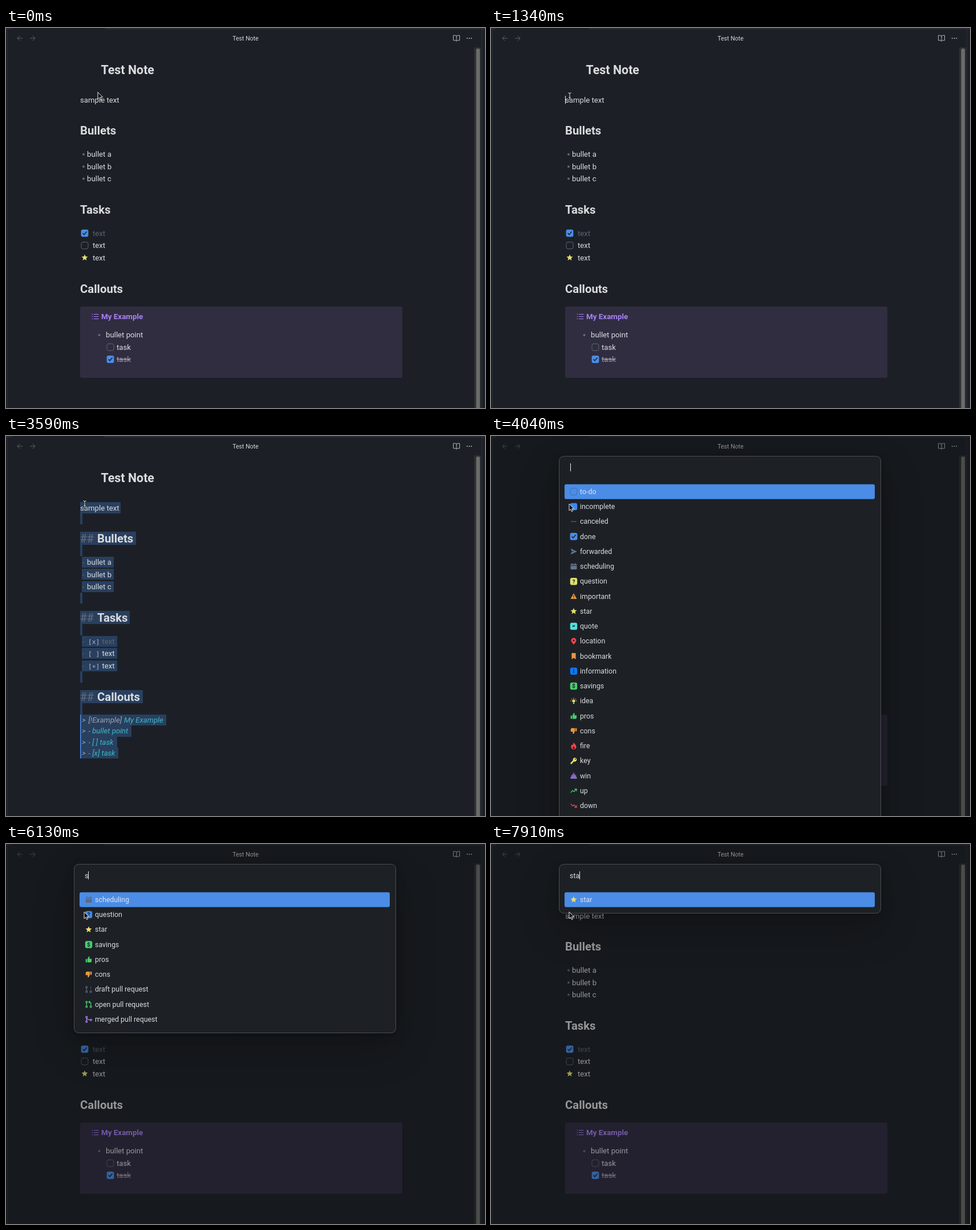
Write an HTML page with a canvas that moves like this. It is 840x667 px and loops after 8 s.

```html
<!DOCTYPE html>
<html lang="en">
<head>
<meta charset="utf-8">
<title>Test Note</title>
<style>
html, body { margin: 0; width: 840px; height: 667px; overflow: hidden; background: #1c2026; }
canvas { display: block; }
</style>
</head>
<body>
<canvas id="stage" width="840" height="667"></canvas>
<script>
const g = document.getElementById('stage').getContext('2d');
const LOOP = 8000, ROW = 26.25;
const SANS = 'Roboto, Inter, sans-serif', MONO = '"DejaVu Sans Mono", monospace';
const BODY = `13.2px ${SANS}`, HEAD = `bold 20.3px ${SANS}`, MENU = `12.4px ${SANS}`;
const ITALIC = `italic 13.1px ${SANS}`;
const BG = '#1c2026', INK = '#dadcde', BLUE = '#4b8ce6', SELECT = '#293f5e';
const FAINT = '#596474', STAR = '#e8df6c', PURPLE = '#a882f5', CYAN = '#3cb9c6';
const GREEN = '#44cf6e', ORANGE = '#e9973f', RED = '#fb464c';

function rect(x, y, x2, y2, color) {
  g.fillStyle = color;
  g.fillRect(x, y, x2 - x, y2 - y);
}

function round(x, y, w, h, r, fill, stroke) {
  g.beginPath();
  g.roundRect(x, y, w, h, r);
  if (fill) { g.fillStyle = fill; g.fill(); }
  if (stroke) { g.strokeStyle = stroke; g.lineWidth = 1; g.stroke(); }
}

function text(s, x, y, font = BODY, color = INK, align = 'left') {
  g.font = font;
  g.fillStyle = color;
  g.textAlign = align;
  g.fillText(s, x, y);
}

function dot(x, y, r, color) {
  g.fillStyle = color;
  g.beginPath();
  g.arc(x, y, r, 0, 7);
  g.fill();
}

function line(d, color, width = 1) {
  g.strokeStyle = color;
  g.lineWidth = width;
  g.lineCap = g.lineJoin = 'round';
  g.stroke(new Path2D(d));
}

function at(x, y, draw) {
  g.save();
  g.translate(x, y);
  draw();
  g.restore();
}

// Icons are drawn around their centre, about 12 px wide.
const ring = (x, y, r = 1.4) => `M${x - r} ${y}a${r} ${r} 0 1 0 ${2 * r} 0a${r} ${r} 0 1 0 ${-2 * r} 0`;
const shape = (color, d) => tint => {
  g.fillStyle = tint || color;
  g.fill(new Path2D(d), 'evenodd');
};
const wire = (color, d, width = 1.3) => tint => line(d, tint || color, width);
const tile = (color, glyph, dy = 3.4, size = 9.5) => tint => {
  round(-6.2, -6.2, 12.4, 12.4, 3, tint || color);
  text(glyph, 0, dy, `bold ${size}px ${SANS}`, BG, 'center');
};
const flip = (draw, sx, sy) => tint => { g.scale(sx, sy); draw(tint); };

let starPath = '';
for (let i = 0; i < 10; i++) {
  const a = i * Math.PI / 5 - Math.PI / 2, r = i % 2 ? 2.6 : 5.8;
  starPath += `${i ? 'L' : 'M'}${r * Math.cos(a)} ${r * Math.sin(a)}`;
}

const thumb = 'M-5.3-.6H-3V5H-5.3ZM-2.2-.6L.2-5.4C2-5.3 1.9-3 1.3-1.3H5C5.8 1 5 4.5 3.8 5H-2.2Z';
const trend = 'M-5 3L-2-.5L.5 1.5L5-3M1.8-3H5V.2';
const branch = ring(-3.7, -4) + ring(-3.7, 4) + ring(3.7, 4);

const icons = {
  'to-do': tint => round(-6, -6, 12, 12, 3, null, tint || FAINT),
  incomplete: tile(BLUE, ''),
  canceled: wire(FAINT, 'M-4.3 0H4.3'),
  done: () => {
    round(-6.4, -6.4, 12.8, 12.8, 3, BLUE);
    line('M-3 .3L-1 2.5L3.2-2.4', BG, 1.5);
  },
  forwarded: shape('#64748b', 'M-5.2-5.2L5.8 0L-5.2 5.2L-3.8.9L1 0L-3.8-.9Z'),
  scheduling: shape('#64748b', 'M-5.5-4.3H-3.5V-5.8H-2V-4.3H2V-5.8H3.5V-4.3H5.5V-2.2H-5.5ZM-5.5-1.3H5.5V4Q5.5 5.3 4.2 5.3H-4.2Q-5.5 5.3-5.5 4Z'),
  question: tile('#e0de71', '?'),
  important: shape(ORANGE, 'M0-5.4L5.5 4.5H-5.5ZM-.6-1.9H.6V1.4H-.6ZM-.6 2.2H.6V3.4H-.6Z'),
  star: shape(STAR, starPath + 'Z'),
  quote: tile('#53dfdd', '“', 8.2, 13),
  location: shape(RED, 'M0 6C-2 3-4.5 1-4.5-1.3A4.5 4.5 0 0 1 4.5-1.3C4.5 1 2 3 0 6Z' + ring(0, -1.3, 1.6)),
  bookmark: shape(ORANGE, 'M-3.6-5.5H3.6V5.5L0 3L-3.6 5.5Z'),
  information: tile('#0a78f5', 'i'),
  savings: tile(GREEN, '$'),
  idea: shape(STAR, ring(0, -.2, 2.6) + 'M-1.2 3H1.2V5H-1.2ZM-.5-5.6H.5V-3.8H-.5ZM-5.6-.8H-3.8V.2H-5.6ZM3.8-.8H5.6V.2H3.8ZM-4.4-3.6L-3.7-4.3L-2.5-3.1L-3.2-2.4ZM4.4-3.6L3.7-4.3L2.5-3.1L3.2-2.4Z'),
  pros: shape(GREEN, thumb),
  cons: flip(shape(ORANGE, thumb), -1, -1),
  fire: shape(RED, 'M.3-6C1-3.5 4.6-2 4.6 1.6A4.6 4.4 0 0 1-4.6 1.6C-4.6-.3-3.5-1.6-2.6-2.6C-2.3-1.6-1.6-1.2-1-1.4C-1-3-1-4.8.3-6ZM0 .5C1.5 2 2 2.6 1.8 3.4A1.8 1.8 0 0 1-1.8 3.4C-1.8 2.5-.5 2 0 .5Z'),
  key: shape(STAR, 'M-1.2-.9A3.4 3.4 0 1 1 .9 1.2L-1.4 2.6V4H-3V5.5H-5.5V3.6Z' + ring(3, -3, 1)),
  win: shape(PURPLE, 'M-5.5 2.5H5.5V4.8H-5.5ZM-4-.8H4L4.8 1.8H-4.8ZM-2.5-3H2.5V-1.4H-2.5ZM-.6-5.4H.6V-3.6H-.6Z'),
  up: wire(GREEN, trend),
  down: flip(wire(RED, trend), 1, -1),
  'draft pull request': wire(FAINT, branch + 'M-3.7-2.4V2.4M3.7-4.5V-3.8M3.7-.7V0'),
  'open pull request': wire(GREEN, branch + 'M-3.7-2.4V2.4M3.7 2.4V-2Q3.7-4 2-4H0M1.6-5.6L0-4L1.6-2.4'),
  'merged pull request': wire(PURPLE, ring(-3.7, -4) + ring(-3.7, 4) + ring(4, 1) + 'M-3.7-2.4V2.4M-3.7-2.4Q-2.5 1 2.4 1')
};
const icon = (name, x, y, tint) => at(x, y, () => icons[name](tint));

const fuzzy = (name, query) => {
  let i = 0;
  for (const c of name) if (c === query[i]) i++;
  return i === query.length;
};

function frame(focused) {
  rect(0, 0, 840, 667, BG);
  const tabEnd = focused ? 172 : 174;
  rect(0, 1, 10, 2, '#353a40');
  rect(tabEnd, 1, 840, 2, '#353a40');
  rect(2, 2, 3, 667, '#2c3036');
  rect(834, 2, 835, 667, '#2c3036');
  rect(821, 34, 833, 667, '#2d2f30');
  round(824.5, 36, 6.5, 650, 3.2, '#6a6c6c');
  line('M28.5 18H20M24 14L20 18L24 22', '#5c6168');
  line('M42.5 18H51M47 14L51 18L47 22', '#5c6168');
  line('M790 14.5V23Q789 21.7 787 21.7H784.5V13H787.5Q790 13 790 14.8Q790 13 792.5 13H795.5V21.7H793Q791 21.7 790 23', '#b3b6ba');
  for (const x of [808.8, 812.5, 816.2]) dot(x, 18, 1, '#b3b6ba');
  text('Test Note', 420, 21.8, `10.6px ${SANS}`, '#d4d6d8', 'center');
  text('Test Note', 166.5, 80.8, `bold 21.4px ${SANS}`);
}

function preview() {
  text('sample text', 130, 130.7);
  text('Bullets', 130, 187, HEAD);
  text('Tasks', 130, 326, HEAD);
  text('Callouts', 130, 464.7, HEAD);
  ['a', 'b', 'c'].forEach((c, i) => {
    const y = 221.5 + i * 21.4;
    dot(136, y + .3, 2, '#616873');
    text('bullet ' + c, 142, y + 4.6);
  });
  ['done', 'to-do', 'star'].forEach((name, i) => {
    const y = 360.2 + i * 21.5;
    icon(name, 138, y);
    text('text', 152, y + 4.6, BODY, i ? INK : FAINT);
  });
  round(130, 489, 565, 125, 3, '#302d41');
  for (const y of [502.5, 506.5, 510.5]) {
    dot(151.5, y, .8, PURPLE);
    line(`M154.5 ${y}H162`, PURPLE, 1.1);
  }
  text('My Example', 167, 511.2, `600 13.4px ${SANS}`, PURPLE);
  dot(163.5, 539, 2, '#6a6a78');
  text('bullet point', 175, 543.3);
  icon('to-do', 183, 560.3);
  text('task', 194, 564.7);
  icon('done', 183, 581.5);
  text('task', 194, 586, BODY, '#a5a4ae');
  rect(194, 581, 219, 582, '#a5a4ae');
}

function editing() {
  const mark = (x2, y, y2, x = 130) => rect(x, y, x2, y2, SELECT);
  mark(201, 116, 136);
  mark(134, 136, 155);
  text('sample text', 130, 130.7);
  [['Bullets', 228, 168], ['Tasks', 217, 307], ['Callouts', 240, 446]].forEach(([s, x2, y]) => {
    mark(x2, y, y + 23);
    mark(134, y + 23, y + 43);
    text('##', 130, y + 18.9, HEAD, FAINT);
    text(s, 160, y + 18.9, HEAD);
  });
  ['a', 'b', 'c'].forEach((c, i) => {
    const y = 221.5 + i * 21.4;
    mark(189, Math.round(y - 9.5), Math.round(y + 9.5), 133);
    text('-', 133.5, y + 4.6, BODY, FAINT);
    text('bullet ' + c, 142, y + 4.6);
  });
  mark(134, 275, 294);
  ['[x]', '[ ]', '[∗]'].forEach((s, i) => {
    const y = 360.2 + i * 21.5;
    mark(195, Math.round(y - 9.7), Math.round(y + 9.5), 133);
    text('-', 133.5, y + 4.6, BODY, FAINT);
    text(s, 144, y + 4.3, `11.2px ${MONO}`, '#b4bbc5');
    text('text', 168.5, y + 4.6, BODY, i ? INK : FAINT);
  });
  mark(134, 413, 433);
  const quote = [['[!Example]', 281], ['- bullet point', 220], ['- [ ] task', 195], ['- [x] task', 197]];
  quote.forEach(([s, x2], i) => {
    const y = 489 + i * 19.3;
    mark(x2, Math.round(y), Math.round(y + 19.3));
    text('>', 133, y + 14, ITALIC, '#9ba5b3');
    text(s, 144.5, y + 14, ITALIC, i ? CYAN : '#9ba5b3');
    if (!i) text('My Example', 207, y + 14, ITALIC, CYAN);
  });
  rect(130, 489, 131.5, 566, '#4d8fea');
}

function modal(query, caret) {
  rect(0, 0, 840, 667, 'rgba(10,10,10,.33)');
  const names = Object.keys(icons).filter(n => fuzzy(n, query));
  const h = 86 + (names.length - 1) * ROW;
  for (const [dy, blur, alpha] of [[25, 74, .2], [5, 20, .11], [1.5, 6, .07]]) {
    g.save();
    g.shadowOffsetY = dy;
    g.shadowBlur = blur;
    g.shadowColor = `rgba(0,0,0,${alpha})`;
    round(119, 35.5, 565, h, 8, '#1d2126');
    g.restore();
  }
  round(119.5, 35.5, 564, h, 8, '#1d2126', '#4b4f54');
  text(query, 138, 59.8, MENU);
  if (caret) {
    g.font = MENU;
    const x = query ? Math.round(138 + g.measureText(query).width) : 139;
    rect(x, 48, x + 1, 62, '#f0f0f0');
  }
  round(129, 84.7, 544, 26, 3, BLUE);
  names.forEach((name, i) => {
    const y = 97.7 + i * ROW;
    if (y > 680) return;
    let tint = null;
    if (i === 0 && name === 'to-do') tint = '#3b70bd';
    if (i === 0 && name === 'scheduling') tint = '#5d6b86';
    if (i === 1) tint = '#3f88ee';
    icon(name, 145, y, tint);
    text(name, 156, y + 4.2, MENU, i ? INK : '#dde5ef');
  });
}

function arrow(x, y) {
  at(x, y, () => {
    const d = new Path2D('M.5.5V12L3.2 9.6L5 13.7L7 12.8L5.2 8.8H8.8Z');
    g.fillStyle = '#101214';
    g.fill(d);
    g.lineJoin = 'miter';
    g.lineWidth = 1;
    g.strokeStyle = '#e8e8e8';
    g.stroke(d);
  });
}

function beam() {
  const d = 'M135.5 114H137L138 115L139 114H140.5M138 115V125M135.5 126.5H137L138 125.5L139 126.5H140.5M136.5 122H139.5';
  line(d, '#15181c', 2.6);
  line(d, '#e6e6e6', 1);
}

const between = (t, ...spans) => spans.some(([a, b]) => t >= a && t < b);

function draw(t) {
  const open = t >= 4040;
  frame(t >= 440);
  if (between(t, [1790, 4040])) editing();
  else preview();
  if (between(t, [440, 890], [1340, 1790])) rect(130, 119, 131, 133, '#f0f0f0');
  if (between(t, [1790, 2390], [2990, 3590])) rect(129, 568, 130, 583, '#f0f0f0');
  if (open) {
    const query = 'sta'.slice(0, [6130, 6420, 6870].filter(k => t >= k).length);
    modal(query, between(t, [4040, 4640], [5090, 5530], [6130, 7310], [7910, LOOP]));
    arrow(136.5, 119);
  } else if (t < 150) arrow(160.5, 112.5);
  else if (t < 300) arrow(147.5, 117.5);
  else if (t < 740) arrow(135.5, 113);
  else beam();
}

const start = performance.now();
function tick() {
  draw((performance.now() - start) % LOOP);
  requestAnimationFrame(tick);
}
tick();
</script>
</body>
</html>
```
